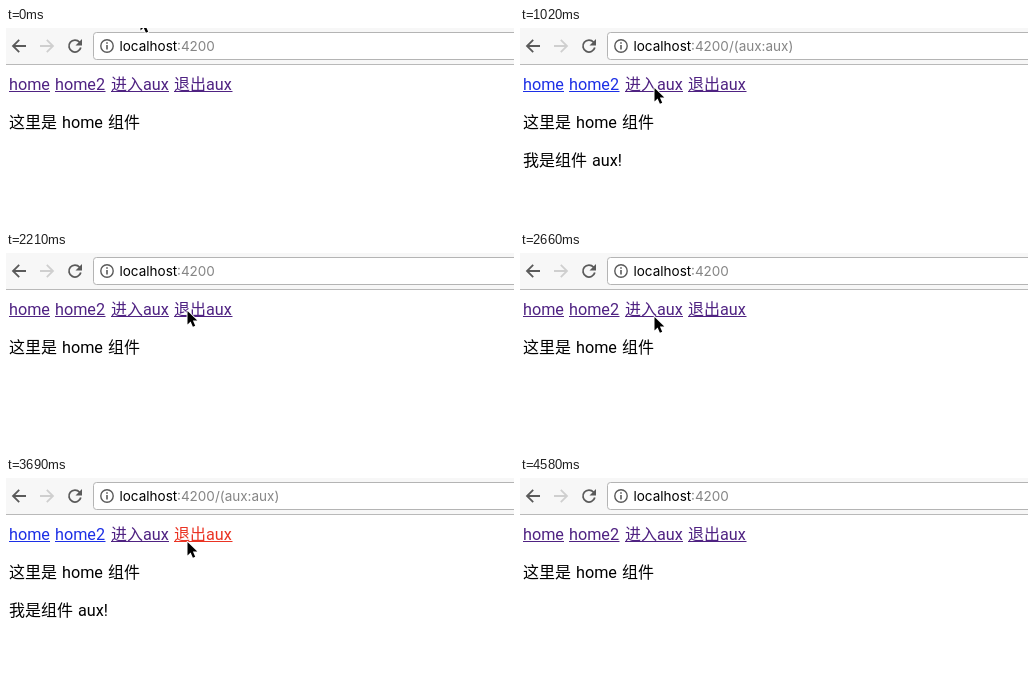
Animation, 508 px wide and 197 px high, one loop 5630 ms. Source, as an HTML page:

```html
<!DOCTYPE html>
<html lang="zh-CN">
<head>
<meta charset="utf-8">
<style>
  html, body { margin: 0; height: 100%; overflow: hidden; background: #fff; }
  svg { display: block; }
  .page { font: 16.2px Roboto, "Noto Sans CJK SC", "Noto Sans CJK", sans-serif; }
  .zh { font-size: 16px; font-family: "Noto Sans CJK SC", "Noto Sans CJK", sans-serif; }
  .url { font: 13.5px Inter, sans-serif; }
  .icon { fill: none; stroke: #5a5a5a; stroke-width: 1.8; }
</style>
</head>
<body>
<svg width="508" height="197" viewBox="0 0 508 197">
  <rect width="508" height="36" fill="#f7f7f7"/>
  <rect y="36" width="508" height="1" fill="#b9b9b9"/>
  <rect x="87.5" y="4.5" width="440" height="27" rx="3" fill="#fff" stroke="#b4b4b4"/>

  <g class="icon">
    <path d="M20 18H7.5M13.2 11.8L7 18l6.2 6.2"/>
    <path d="M34 18h12.500M40.800 11.800L47 18l-6.200 6.200" stroke="#cfcfcf"/>
    <path d="M73.600 14.200A6 6 0 1 0 74.800 19.500"/>
    <path d="M76 11v6.500h-6.500z" fill="#5a5a5a" stroke="none"/>
    <circle cx="101" cy="18" r="6.200" stroke-width="1.400"/>
    <path d="M101 17v4.500M101 14.200v1.600" stroke-width="1.600"/>
  </g>

  <g class="url">
    <text x="113.500" y="23">localhost</text>
    <text id="path" x="171" y="23" fill="#858585"></text>
  </g>

  <g class="page">
    <g id="home">
      <text x="3" y="62">home</text><rect x="3" y="63" width="41" height="1"/>
      <text x="49" y="62">home2</text><rect x="49" y="63" width="50.500" height="1"/>
    </g>
    <g id="enter">
      <text class="zh" x="105" y="62">进入</text><text x="137" y="62">aux</text>
      <rect x="105" y="63" width="58" height="1"/>
    </g>
    <g id="leave">
      <text class="zh" x="168" y="62">退出</text><text x="200" y="62">aux</text>
      <rect x="168" y="63" width="58.500" height="1"/>
    </g>
    <text class="zh" x="3" y="100">这里是</text>
    <text x="56" y="100">home</text>
    <text class="zh" x="102" y="100">组件</text>
    <g id="aux">
      <text class="zh" x="3" y="138">我是组件</text>
      <text x="72" y="138">aux!</text>
    </g>
  </g>

  <g id="cursor" stroke-linejoin="round">
    <path id="arrow" d="M1.500 1V14.400L4.600 11.500 6.900 16.800 9.200 15.800 6.900 10.600H11.300Z"
          stroke="#fff" stroke-width="1.800" paint-order="stroke"/>
    <path id="hand" fill="#fff" stroke="#000" stroke-width="1.200"
          d="M5 11V2.500Q5 1 6.300 1T7.600 2.500V7Q9.500 5.800 10 7.500 12 6.500 12.500 8.200 15 7.500 15 10V13L13 18H6.500L1.300 11.500Q1 9.500 3 9.800Z"/>
  </g>
</svg>
<script>
const LOOP = 5630;
const VISITED = '#4f2282', UNVISITED = '#1c2fe6', ACTIVE = '#ea3323';
const $ = id => document.getElementById(id);

// Pointer positions: start time, x, y, hand shape
const moves = [
  [0, 133, -12], [300, 133, 30], [440, 136, 49], [590, 142, 60],
  [1020, 133, 59], [1470, 139, 59], [1620, 171, 58, true], [1770, 179, 57],
  [1920, 180, 57], [2360, 166, 61], [2510, 134, 64], [2660, 133, 63],
  [3100, 145, 63], [3250, 177, 64], [3400, 180, 63], [4290, 171, 32, true],
  [4430, 173, -7], [4580, 173, -40]
];

const paint = (id, color) => $(id).setAttribute('fill', color);
const show = (id, on) => $(id).setAttribute('visibility', on ? 'visible' : 'hidden');

function draw(t) {
  const within = (a, b) => t >= a && t < b;
  const open = within(880, 2210) || within(2810, 3840);
  const leaving = within(2060, 2210) || within(3690, 3840);

  $('path').textContent = ':4200' + (open ? '/(aux:aux)' : '');
  show('aux', open);
  paint('home', open ? UNVISITED : VISITED);
  paint('enter', within(730, 880) ? ACTIVE : VISITED);
  paint('leave', leaving ? ACTIVE : VISITED);

  const [, x, y, hand] = moves.filter(m => m[0] <= t).pop();
  $('cursor').setAttribute('transform', `translate(${x} ${y})`);
  show('arrow', !hand);
  show('hand', hand);
}

function tick() {
  draw(performance.now() % LOOP);
  requestAnimationFrame(tick);
}
tick();
</script>
</body>
</html>
```
